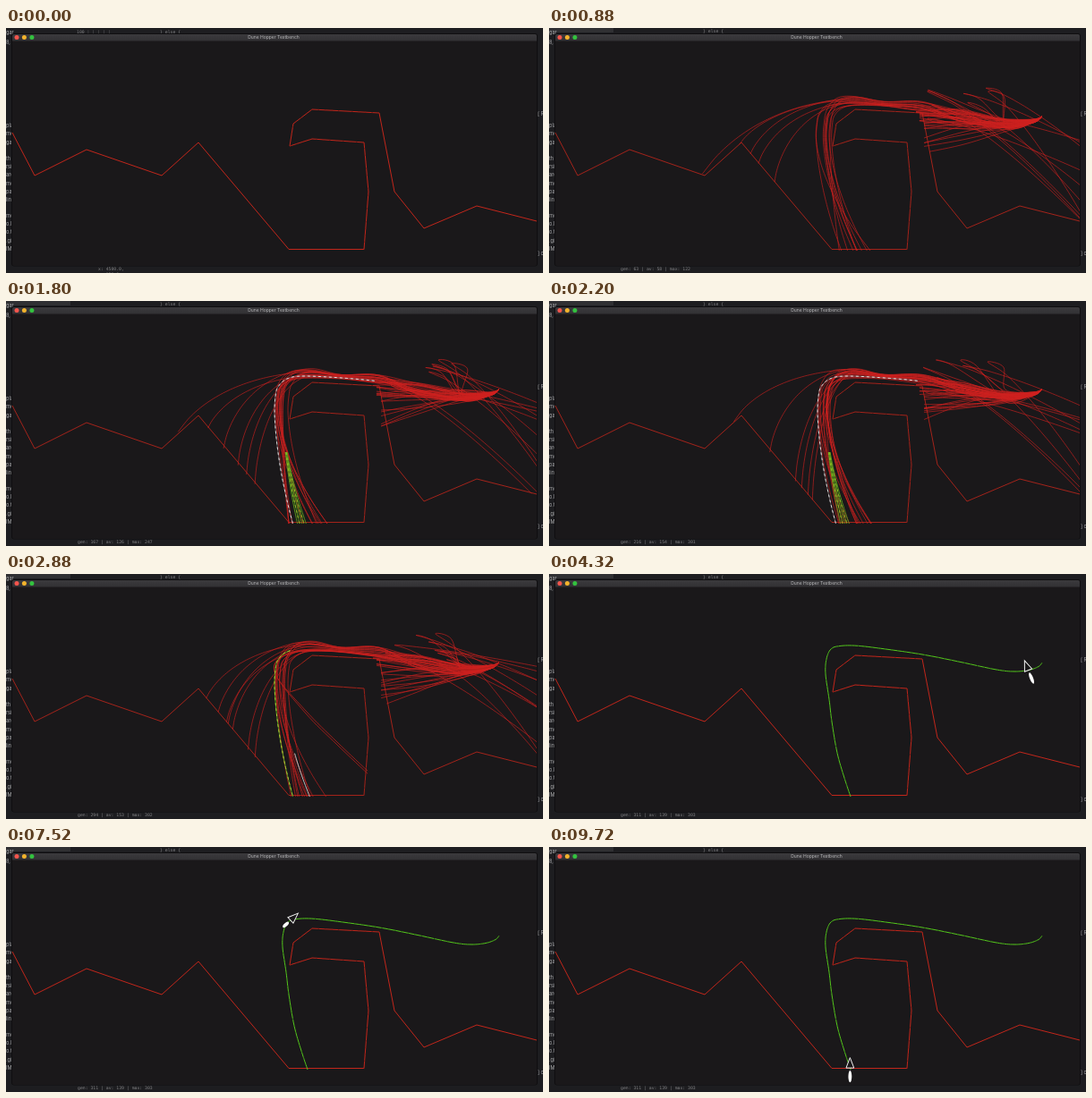
Recreate the animation shown at these times as an HTML page with a canvas. Size 600 by 274 pixels, loop 9.76 s.

```html
<!DOCTYPE html>
<html lang="en">
<head>
<meta charset="utf-8">
<title>Dune Hopper Testbench</title>
<style>
  html, body { margin: 0; width: 600px; height: 274px; overflow: hidden; background: #1d1d20; }
  svg, canvas { position: absolute; left: 0; top: 0; display: block; }
  .mono { font: 4.8px "DejaVu Sans Mono", "Liberation Mono", monospace; fill: #818183; white-space: pre; }
  .edge { fill: #a9a9ab; font-size: 5.6px; font-family: Inter, Roboto, sans-serif; }
  .title { font: 5px Inter, Roboto, sans-serif; fill: #b9b9bb; text-anchor: middle; }
  .line { fill: none; stroke-width: 1; }
</style>
</head>
<body>
<svg id="stage" width="600" height="274" viewBox="0 0 600 274">
  <defs>
    <linearGradient id="bar" x2="0" y2="1">
      <stop offset="0" stop-color="#3b3a3d"/>
      <stop offset="1" stop-color="#323134"/>
    </linearGradient>
  </defs>
  <rect width="600" height="274" fill="#1d1d20"/>
  <g id="editor" class="mono">
    <text x="79" y="6">100  ¦  ¦  ¦  ¦  ¦</text>
    <text x="172" y="6">} else {</text>
    <text x="103" y="271">x: 4500.0,</text>
    <text x="103" y="277">y: 150.0</text>
  </g>
  <g id="terminal" class="mono">
    <rect width="72" height="5" fill="#303033"/>
    <text x="172" y="5">} else {</text>
    <text id="stats" x="80" y="271"></text>
  </g>
  <g id="margins" class="edge"></g>
  <rect x="6" y="6" width="588" height="260.5" rx="3" fill="#0f0e10"/>
  <rect x="7" y="7" width="586" height="259" rx="2" fill="#1a181a"/>
  <path d="M7 14.5V9a2 2 0 0 1 2-2H591a2 2 0 0 1 2 2V14.5Z" fill="url(#bar)"/>
  <circle cx="12" cy="10.6" r="2.5" fill="#f4554d"/>
  <circle cx="20.4" cy="10.6" r="2.5" fill="#f2b32c"/>
  <circle cx="28.9" cy="10.6" r="2.5" fill="#33c23f"/>
  <text class="title" x="299" y="12.4">Dune Hopper Testbench</text>
  <g id="land">
    <path id="ground" class="line" stroke="#c2261b"/>
    <path id="wall" class="line" stroke="#7c1c17" stroke-dasharray="1.5 6"/>
  </g>
  <g id="flight">
    <path id="route" class="line" stroke="#55c81c"/>
    <path id="ticks" class="line" stroke="#2c6417" stroke-dasharray="1.5 6"/>
    <g id="lander">
      <path d="M0-11.5L4.4 0H-4.4Z" fill="#1a181a" stroke="#f2f2f2"/>
      <ellipse id="flame" rx="1.9" fill="#fff"/>
    </g>
  </g>
</svg>
<canvas id="cloud" width="600" height="274"></canvas>
<script>
const LOOP = 9760, EVOLVE = 280, LAUNCH = 3040;
const $ = id => document.getElementById(id);
const ctx = $('cloud').getContext('2d');
const clamp = (v, lo = 0, hi = 1) => Math.min(hi, Math.max(lo, v));
const toPath = pts => 'M' + pts.map(p => p.map(v => +v.toFixed(2)).join(' ')).join('L');

const terrain = [[7,117],[32,165],[90,136],[174,165],[215,128],[316,247.5],[400,247.5],
  [405,183],[400,128],[342,124],[317,132],[321,107],[342,91],[417,95],[434,183],
  [467,224],[526,199],[593,216]];
const rock = new Path2D(toPath([...terrain, [593,274], [7,274]]) + 'Z');
const route = spline([[551,99],[547,103.5],[536,107.5],[520,109],[500,107],[460,98.5],[420,90.5],
  [380,84.5],[345,80.3],[325,80.5],[315,84],[310,95],[309,112],[313,140],[316,165],
  [322,200],[330,228],[337,249]]);

// [time, generation] and [generation, value]
const genKeys = [[280,0],[1400,119],[2200,216],[2880,294],[3040,311]];
const avKeys = [[0,12],[119,98],[216,154],[294,153],[311,139]];
const maxKeys = [[0,40],[119,194],[216,301],[294,302],[311,303]];
const tiltKeys = [[3040,0],[3500,-26],[4600,-20],[5880,-2],[6500,14],[7000,38],[7520,47],
  [8300,24],[9000,8],[9500,0]];
const thrustKeys = [[3040,.2],[3400,1],[5880,1],[7000,.75],[7520,.65],[8400,.7],[9000,1]];

// Catmull-Rom samples through the points
function spline(pts, n = 8) {
  const out = [], at = i => pts[clamp(i, 0, pts.length - 1)];
  for (let i = 0; i < pts.length - 1; i++) {
    const [a, b, c, d] = [at(i - 1), at(i), at(i + 1), at(i + 2)];
    for (let k = 0; k < n; k++) {
      const u = k / n;
      out.push([0, 1].map(j => b[j] + u / 2 * (c[j] - a[j] + u * (2 * a[j] - 5 * b[j] + 4 * c[j] - d[j]
        + u * (3 * (b[j] - c[j]) + d[j] - a[j])))));
    }
  }
  out.push(pts[pts.length - 1]);
  return out;
}

function ramp(keys, x) {
  if (x <= keys[0][0]) return keys[0][1];
  for (let i = 1; i < keys.length; i++) {
    const [x0, y0] = keys[i - 1], [x1, y1] = keys[i];
    if (x <= x1) return y0 + (y1 - y0) * (x - x0) / (x1 - x0);
  }
  return keys[keys.length - 1][1];
}

function random(seed) {
  let s = seed * 2654435761 >>> 0;
  return () => {
    s = s + 0x6D2B79F5 >>> 0;
    let v = Math.imul(s ^ s >>> 15, s | 1);
    v ^= v + Math.imul(v ^ v >>> 7, v | 61);
    return ((v ^ v >>> 14) >>> 0) / 4294967296;
  };
}

const curve = (f, end = 1, n = 12) => Array.from({ length: n + 1 }, (_, i) => f(i / n * end));
// Leaves the start and reaches the ledge; the two offsets sway the halves apart
const approach = (near, far) => [[551,99],[541,104 + near * .3],[510,107 + near * .7],
  [460,98 + near],[417,90 + far]];

// Over the ledge, round its tip and down to the pad
function over(cx, land, near = 0, far = 0) {
  const drop = curve(u => {
    const y = 125 + 126 * u;
    return [cx + (land - cx) * Math.pow((y - 120) / 131, 1.7), y];
  }, 1, 5);
  return spline([...approach(near, far), [375,86 + far * .5], [cx + 32,84 + far], [cx + 14,87 + far],
    [cx + 4,96 + far / 2], [cx + 1,107], ...drop]);
}

// Flies past the tip and falls on the left slope at tx
function overshoot(tx, near, far) {
  const slope = tx > 215 ? 128 + (tx - 215) * 1.18 : 128 + (215 - tx) * .8;
  const end = .9 + .6 * clamp((tx - 150) / 110), top = 83 + far;
  return spline([...approach(near, far), [375,86 + far * .5], ...curve(a => [
    345 - (351 - tx) * Math.sin(a) / Math.sin(end),
    top + (slope + 5 - top) * (1 - Math.cos(a)) / (1 - Math.cos(end))], end, 7)]);
}

function slopeHit(y, near) {
  return spline([[551,99],[541,104 + near * .3],[505,105 + near + (y - 95) * .15],
    [460,98 + near + (y - 95) * .6],[410,y]]);
}

function turnBack(tx, top, exit, near) {
  const back = curve(u => [tx + (604 - tx) * u, top + (exit - top) * Math.pow(u, 1.3)], 1, 6);
  return spline([[551,99],[541,104 + near * .3],[510,106 + near],[tx + 18,top + 6], ...back]);
}

function scatter(rnd) {
  const vx = rnd() * 190 - 125, vy = rnd() * 90 - 55, g = 60 + rnd() * 60;
  return curve(u => [551 + vx * u, 99 + vy * u + g * u * u], 2.2, 40);
}

function candidate(rnd, gen) {
  if (rnd() < 1 - gen / 60) return scatter(rnd);
  const ready = clamp((gen - 25) / 60), kind = rnd();
  const near = rnd() * 14 - 7, far = rnd() * 11 - 8;
  if (kind < .14 * ready) return overshoot(300 - (gen > 260 ? 75 : 140) * Math.pow(rnd(), 1.3), near, far);
  if (kind < .46 * ready) return over(298 + 18 * rnd(), 316 + 46 * rnd(), near, far);
  if (kind > .72) return turnBack(418 + 80 * rnd(), 64 + 38 * rnd(), 105 + 130 * rnd(), near);
  return slopeHit(93 + 58 * Math.pow(rnd(), 1.5), near);
}

function trace(pts, color, dash = [], width = .8) {
  ctx.beginPath();
  ctx.strokeStyle = color;
  ctx.lineWidth = width;
  ctx.setLineDash(dash);
  for (const [x, y] of pts) {
    ctx.lineTo(x, y);
    if (ctx.isPointInPath(rock, x, y)) break;
  }
  ctx.stroke();
}

// Highlights only the part of a good run past the given corner
function elite(cx, land, fromX, fromY, color, dots) {
  const pts = over(cx, land);
  const part = pts.slice(pts.findIndex(([x, y]) => x <= fromX && y >= fromY));
  trace(part, color, [], .9);
  if (dots) trace(part, dots, [3, 3], .9);
}

function drawCloud(t) {
  ctx.clearRect(0, 0, 600, 274);
  const on = t >= EVOLVE && t < LAUNCH;
  $('land').style.opacity = on ? .82 : 1;
  if (!on) return;
  const tick = Math.floor(t / 40), gen = ramp(genKeys, tick * 40), rnd = random(tick);
  ctx.save();
  ctx.beginPath();
  ctx.rect(7, 15, 586, 251);
  ctx.clip();
  for (let i = 0; i < 50; i++) trace(candidate(rnd, gen), 'rgba(206,34,32,.8)');
  if (gen > 260) {
    for (const d of [0, 3]) {
      trace(spline([...approach(0, 0), [345,84], [309,92], [301,112], [335,153 + d], [370,188 + d], [407,223 + d]]),
        '#b8201c');
    }
    elite(300, 321, 318, 80, '#5fb51f', '#b9d23a');
    elite(309, 340, 330, 200, '#d0d0d0');
  } else if (gen > 165) {
    for (let i = 0; i < 5; i++) elite(309, 326 + 2.5 * i, 330, 168, '#5c9f1c', i % 2 ? '#9fc926' : '');
    elite(300, 321, 415, 80, '#77676a', '#eee');
  } else if (gen > 85) {
    for (let i = 0; i < 3; i++) {
      elite(296.5 + i, 316 + 4 * i, 330, 97, '#40508f', i == 1 ? '#c3cbf4' : '#6379cc');
    }
    elite(310, 344, 330, 92, '#5a4a8a', '#c9cdf0');
    elite(309, 339, 330, 92, '#a08088', '#f0f0f4');
  }
  ctx.restore();
}

const lengths = [0];
for (let i = 1; i < route.length; i++) {
  lengths.push(lengths[i - 1] + Math.hypot(route[i][0] - route[i - 1][0], route[i][1] - route[i - 1][1]));
}
const lengthAtX = x => lengths[route.findIndex(p => p[0] <= x)];
// time, distance flown, speed in px per second
const legs = [[LAUNCH, 0, 0], [5880, lengthAtX(460), 70], [7520, lengthAtX(318.5), 60],
  [9720, lengths[lengths.length - 1] - 2, 75]];

function flown(t) {
  if (t >= 9720) return legs[3][1];
  const i = Math.max(1, legs.findIndex(k => k[0] >= t));
  const [t0, a, va] = legs[i - 1], [t1, b, vb] = legs[i];
  const u = (t - t0) / (t1 - t0), s = (t1 - t0) / 1000;
  return a + (b - a) * u * u * (3 - 2 * u) + va * s * u * (1 - u) ** 2 - vb * s * u * u * (1 - u);
}

function drawFlight(t) {
  const on = t >= LAUNCH;
  $('flight').style.display = on ? '' : 'none';
  if (!on) return;
  const d = flown(t);
  const [x, y] = [0, 1].map(j => ramp(lengths.map((l, i) => [l, route[i][j]]), d));
  $('lander').setAttribute('transform', `translate(${x} ${y}) rotate(${ramp(tiltKeys, t)})`);
  const ry = 6.6 * ramp(thrustKeys, t);
  $('flame').setAttribute('ry', ry);
  $('flame').setAttribute('cy', 3 + ry);
}

function draw(now) {
  const t = now % LOOP, running = t >= EVOLVE;
  $('editor').style.display = running ? 'none' : '';
  $('terminal').style.display = running ? '' : 'none';
  const gen = Math.floor(ramp(genKeys, t));
  $('stats').textContent =
    `gen: ${gen} | av: ${Math.round(ramp(avKeys, gen))} | max: ${Math.round(ramp(maxKeys, gen))}`;
  drawCloud(t);
  drawFlight(t);
}

$('ground').setAttribute('d', toPath(terrain));
$('wall').setAttribute('d', toPath(terrain.slice(6, 14)));
$('route').setAttribute('d', toPath(route));
$('ticks').setAttribute('d', toPath(route));

const snippets = { 7: 'gar', 18: '8,', 111: 'pla', 120: 'mo', 130: 'ga', 148: 'th', 157: 'rsi', 166: 'arg',
  176: 'mo', 185: 'pa', 194: 'lin', 212: 'mod', 221: 'o.lo', 230: 'o.to', 240: '.gi', 249: 'IME' };
const label = (x, y, s) => `<text x="${x}" y="${y}">${s}</text>`;
$('margins').innerHTML = Object.entries(snippets).map(([y, s]) => label(0, y, s)).join('')
  + label(594, 98, '[ R') + label(594, 254, '] o');

let start;
function frame(now) {
  start ??= now;
  draw(now - start);
  requestAnimationFrame(frame);
}
draw(0);
requestAnimationFrame(frame);
</script>
</body>
</html>
```
